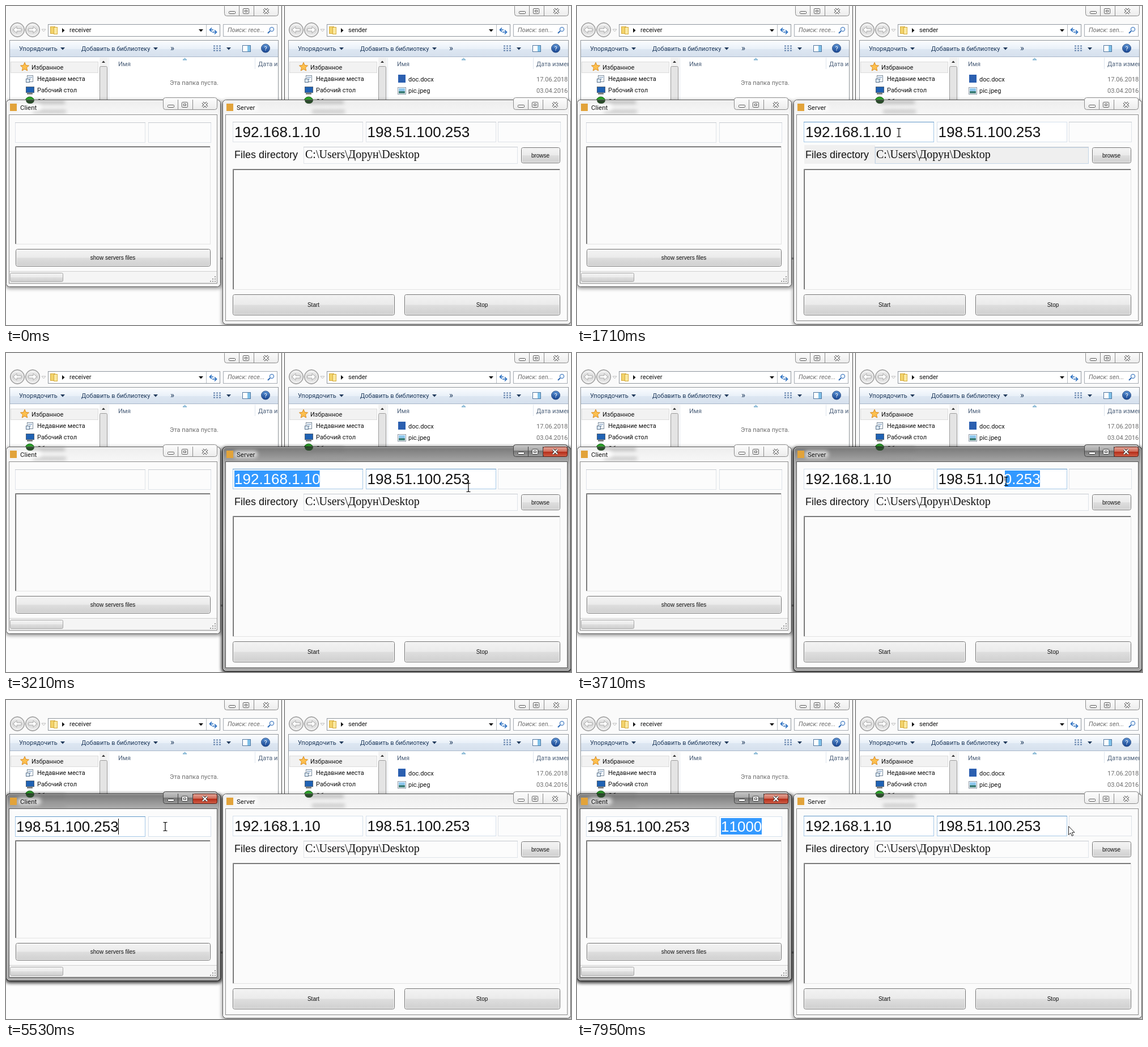
Recreate the animation shown at these times as an HTML page. Size 997x562 px, loop 8000 ms.

```html
<!DOCTYPE html>
<html lang="ru">
<head>
<meta charset="utf-8">
<style>
  html, body { margin: 0; width: 100%; height: 100%; overflow: hidden; background: #fdfdfd; }
  svg { display: block; width: 100vw; height: 100vh; }
  text { font: 11px Roboto, sans-serif; fill: #111; white-space: pre; }
  .title { font-size: 11.5px; }
  .bar { fill: #1e395b; }
  .head { fill: #4c607a; }
  .dim { fill: #6d6d6d; }
  .search { fill: #6d6d6d; font-style: italic; }
  .button { font: 10px "Liberation Sans", sans-serif; text-anchor: middle; }
  .label { font: 18px "Liberation Sans", sans-serif; }
  .path { font: 20px "Liberation Serif", serif; }
  .big { font: 26px "Liberation Sans", sans-serif; font-kerning: none; }
  .picked { fill: #fff; }
</style>
</head>
<body>
<svg id="stage" viewBox="0 0 997 562" xmlns="http://www.w3.org/2000/svg"></svg>
<script>
const LOOP = 8000;
const LOCAL = '192.168.1.10', REMOTE = '198.51.100.253', PORT = '11000';
const SERVER_ON = '1820-4930', CLIENT_ON = '4930-8000';

const box = (x0, y0, x1, y1, fill, stroke = '', r = 0, more = '') => {
  const o = stroke ? 0.5 : 0;
  return `<rect x="${x0 + o}" y="${y0 + o}" width="${x1 - x0}" height="${y1 - y0}" rx="${r}" fill="${fill}" stroke="${stroke || 'none'}" ${more}/>`;
};
const text = (x, y, str, cls = '', more = '') => `<text x="${x}" y="${y}" class="${cls}" ${more}>${str}</text>`;
const path = (d, stroke, fill = 'none', width = 1) =>
  `<path d="${d}" stroke="${stroke}" fill="${fill}" stroke-width="${width}"/>`;
const disc = (x, y, r, fill, stroke = 'none') =>
  `<circle cx="${x}" cy="${y}" r="${r}" fill="${fill}" stroke="${stroke}"/>`;
const on = (times, inner) => `<g data-on="${times}">${inner}</g>`;
const down = (x, y, color = '#1e395b') => path(`M${x - 4} ${y - 2}h8l-4 4.5z`, 'none', color);
const gradient = (id, ...stops) =>
  `<linearGradient id="${id}" x2="0" y2="1">${stops.map(([at, c]) =>
    `<stop offset="${at}" stop-color="${c}"/>`).join('')}</linearGradient>`;

const defs = `<defs>
  ${gradient('face', [0, '#f3f3f3'], [.48, '#ebebeb'], [.52, '#dedede'], [1, '#cfcfcf'])}
  ${gradient('hot', [0, '#eaf6fd'], [.48, '#d9f0fc'], [.52, '#bee6fd'], [1, '#a7d9f5'])}
  ${gradient('tools', [0, '#fbfdff'], [.5, '#e9f0f8'], [.52, '#dde7f2'], [1, '#d5e0ed'])}
  ${gradient('glass', [0, '#ededed'], [.08, '#f8f8f8'], [1, '#f3f3f3'])}
  ${gradient('glassOn', [0, '#777'], [.08, '#b0b0b0'], [.4, '#c9c9c9'], [1, '#a5a5a5'])}
  ${gradient('cap', [0, '#fdfdfd'], [1, '#ececec'])}
  ${gradient('capOn', [0, '#c8c8c8'], [.48, '#a9a9a9'], [.52, '#777'], [1, '#9a9a9a'])}
  ${gradient('red', [0, '#e3a598'], [.48, '#cf6a57'], [.52, '#b52c18'], [1, '#d0614a'])}
  ${gradient('help', [0, '#5f97d8'], [1, '#123f8c'])}
  ${gradient('orb', [0, '#f4f4f4'], [.5, '#d2d2d2'], [1, '#eee'])}
  <filter id="soft" x="-20%" y="-60%" width="140%" height="220%"><feGaussianBlur stdDeviation="3"/></filter>
  <clipPath id="stageClip"><rect width="997" height="562"/></clipPath>
</defs>`;

function caption(x, y, active) {
  const line = active ? '#444' : '#8b8b8b', ink = active ? '#3a3a3a' : '#555';
  return box(x, y - 4, x + 95, y + 17, active ? 'url(#capOn)' : 'url(#cap)', line, 4) +
    (active ? box(x + 52, y, x + 95, y + 17, 'url(#red)', '#5d1a10', 3) : '') +
    path(`M${x + 26.5} ${y}v17M${x + 52.5} ${y}v17`, line) +
    box(x + 8, y + 9, x + 19, y + 13, '#fff', ink, 1) +
    box(x + 33, y + 4, x + 43, y + 13, '#fff', ink, 1) + box(x + 36, y + 7, x + 40, y + 10, '#fff', ink) +
    path(`M${x + 70} ${y + 5}l8 8m0-8l-8 8`, ink, 'none', 4) +
    path(`M${x + 70} ${y + 5}l8 8m0-8l-8 8`, '#fff', 'none', 2);
}

function explorer(x, right, name, query, rows) {
  const r = right - 487;
  return box(x - 1, -20, right - 1, 445, '#fafafa', '#4a4a4a', 6) +
    box(x, -20, right - 2, 444, 'none', '#fff', 5) + caption(r + 385, 0) +
    [20, 47].map(c => disc(x + c, 42, 12.5, '#c9c9c9', '#8a8a8a') + disc(x + c, 42, 10.5, 'url(#orb)', '#fff')).join('') +
    path(`M${x + 13} 42l6-6v4h8v4h-8v4z`, '#aaa', '#fff') + path(`M${x + 54} 42l-6-6v4h-8v4h8v4z`, '#aaa', '#fff') +
    path(`M${x + 63} 41h7l-3.5 4z`, '#bbb', '#fff') +
    box(x + 74, 32, r + 377, 53, '#fff', '#8e959d') +
    path(`M${r + 353.5} 33v20`, '#b9bec4') +
    box(x + 78, 36, x + 86, 48, '#f3d36b', '#d5ab3c') + box(x + 84, 37, x + 90, 49, '#fbe9a1', '#d5ab3c') +
    path(`M${x + 99} 39v8l4.5-4z`, 'none', '#111') + text(x + 112, 46, name) + down(r + 344, 43, '#111') +
    path(`M${r + 359} 42h7m-3-3.5l-3.5 3.5 3.5 3.5M${r + 364} 46h7m-3-3.5l3.5 3.5-3.5 3.5`, '#2a6fc0', 'none', 1.7) +
    box(r + 383, 32, r + 478, 53, '#fff', '#a5abb2') + text(r + 391, 46, 'Поиск: ' + query, 'search') +
    disc(r + 469, 41, 3.7, '#e8f3ff', '#2d69b5') + path(`M${r + 466} 44l-4 4`, '#2d69b5', 'none', 2) +
    box(x + 6, 60, r + 480, 443, '#fff', '#8f9499') + box(x + 7, 61, r + 480, 90, 'url(#tools)') +
    path(`M${x + 7} 89.5H${r + 480}`, '#a9b7c9') +
    text(x + 23, 79, 'Упорядочить', 'bar') + down(x + 100, 75) +
    text(x + 133, 79, 'Добавить в библиотеку', 'bar') + down(x + 264, 75) + text(x + 290, 79, '»', 'bar', 'style="font-size:15px"') +
    [70, 74, 78].map(y => path(`M${r + 366} ${y + .5}h3m2 0h3m2 0h3`, '#6483ad', 'none', 2)).join('') +
    down(r + 393, 75) + box(r + 417, 69, r + 431, 80, '#fff', '#51779f') + box(r + 426, 70, r + 431, 80, '#7fc0e8') +
    disc(r + 458, 74.5, 7.5, 'url(#help)', '#33558a') +
    text(r + 458, 79, '?', 'picked', 'text-anchor="middle" font-weight="bold"') +
    // navigation pane
    box(x + 8, 98, x + 162, 117, '#f2f2f2', '#dcdcdc') +
    path(`M${x + 33} 99.5l2.2 5 5.3.5-4 3.6 1.2 5.4-4.7-2.8-4.7 2.8 1.2-5.4-4-3.6 5.3-.5z`, '#d98a1e', '#fdc04e') +
    text(x + 45, 112, 'Избранное') +
    box(x + 37, 122, x + 47, 133, '#fff', '#778899') + path(`M${x + 39} 125.5h7m-7 3h5`, '#5c87b5') +
    box(x + 35, 128, x + 41, 134, '#dce9f5', '#60758c') + text(x + 55, 132, 'Недавние места') +
    box(x + 35, 142, x + 49, 152, '#1f62b4', '#4c5f75') + path(`M${x + 37} 154.5h10`, '#555', 'none', 2) +
    text(x + 55, 152, 'Рабочий стол') +
    disc(x + 42, 168, 8, '#2fae2c', '#176516') + text(x + 55, 172, 'Облако') +
    box(x + 165, 91, x + 180, 443, '#f2f2f2') + path(`M${x + 169} 100h6l-3-3.5z`, 'none', '#333') +
    box(x + 165, 106, x + 178, 300, '#e4e4e4', '#9b9b9b', 2) + path(`M${x + 181.5} 91v350`, '#e3e8ee') +
    // file list
    text(x + 198, 106, 'Имя', 'head') + path(`M${x + 312} 95l3.5-3 3.5 3z`, '#6fa5c7', '#a9d3ea') +
    path(`M${r + (x ? 418 : 439)}.5 91v20`, '#dde5ee') +
    `<svg width="${r + 480}" height="165">${text(x + 445 - (x ? 1 : 0), 106, 'Дата изменения', 'head')}${rows}</svg>`;
}

const emptyFolder = text(289, 139, 'Эта папка пуста.', 'dim');
const files =
  box(692, 121, 705, 135, '#2b5fb0') + text(710, 133, 'doc.docx') + text(936, 133, '17.06.2018 12:40', 'dim') +
  box(691, 143, 705, 155, '#fff', '#8a97a5') + box(693, 145, 704, 150, '#8ec7ee') + box(693, 150, 704, 154, '#3f7f78') +
  text(710, 153, 'pic.jpeg') + text(936, 153, '03.04.2016 21:15', 'dim');

function frame(x0, y1, x1, name, ghost, active) {
  const edge = active ? '#222' : '#555';
  return box(x0 - 1, 166, x1 + 2, y1 + 3, '#000', '', 7, `filter="url(#soft)" opacity="${active ? .7 : .4}"`) +
    box(x0, 165, x1 - 1, y1 - 1, active ? 'url(#glassOn)' : 'url(#glass)', edge, 6) +
    box(x0 + 1, 166, x1 - 2, y1 - 2, 'none', active ? '#d5d5d5' : '#fff', 5) +
    `<g filter="url(#soft)" opacity="${active ? .6 : .5}">${box(ghost, 167, ghost + 62, 172, '#777')}${
      box(ghost + 6, 183, ghost + 64, 189, '#999')}</g>` +
    `<g filter="url(#soft)">${box(x0 + 20, 172, x0 + 62, 185, '#fff', '', 6, `opacity="${active ? .65 : .9}"`)}</g>` +
    path(`M${ghost - 7} 166h15q-1 6-7.5 6t-7.5-6z`, 'none', '#2b4b2b') +
    box(x0 + 7, 172, x0 + 19, 185, '#e2a33a') +
    text(x0 + 25, 182.5, name, 'title') + caption(x1 - 102, 165, active) +
    box(x0 + 5, 191, x1 - 7, y1 - 7, '#fbfbfb', active ? '#555' : '#8c8c8c');
}

const win = (x0, y1, x1, name, ghost, times) =>
  frame(x0, y1, x1, name, ghost) + on(times, frame(x0, y1, x1, name, ghost, true));

const field = (x0, y0, x1, y1, lit, blue) =>
  box(x0, y0, x1, y1, '#fcfcfc', '#dfe3e9') + path(`M${x0} ${y0 + .5}H${x1 + 1}`, '#c5c9cf') +
  on(lit, box(x0, y0, x1, y1, '#fff', '#d5e0ec')) +
  on(blue, box(x0, y0, x1, y1, '#fff', '#a6c9e8') + path(`M${x0} ${y0 + .5}H${x1 + 1}`, '#5f97c9'));

const list = (x0, y0, x1, y1) => box(x0, y0, x1, y1, '#fbfbfb', '#e3e3e3') +
  path(`M${x0 + .5} ${y1}V${y0 + .5}H${x1}`, '#8a8a8a') + path(`M${x0 + 1.5} ${y1}V${y0 + 1.5}H${x1}`, '#6b6b6b');

const button = (x0, y0, x1, y1, name, hover = '') => {
  const body = (fill, edge) => box(x0, y0, x1, y1, fill, edge, 3) + box(x0 + 1, y0 + 1, x1 - 1, y1 - 1, 'none', '#f8f8f8', 2);
  return body('url(#face)', '#707070') + on(hover, body('url(#hot)', '#3c7fb1')) +
    text((x0 + x1) / 2, (y0 + y1) / 2 + 4, name, 'button');
};

const caret = (x, y, times) => on(times, box(x, y, x + 1, y + 28, '#000'));
const selection = (id, x, y, width, str, times) =>
  on(times, `<g id="${id}">${box(x, y, x + width, y + 29, '#3399ff')}${text(x, y + 24, str, 'big picked')}</g>`);

const client = win(0, 495, 379, 'Client', 42, CLIENT_ON) +
  field(16, 205, 245, 240, '4640-8000', '4700-5830 7330-7460') +
  field(251, 205, 361, 240, '4540-8000', '4580-4700 5470-5530 5590-7950') +
  list(16, 247, 360, 419) + button(17, 428, 360, 458, 'show servers files') +
  box(6, 468, 372, 488, '#f5f5f5') + path('M6 467.5H372', '#cfcfcf') +
  box(7, 470, 100, 485, 'url(#face)', '#a5a5a5', 2) +
  [[368, 476], [364, 480], [368, 480], [360, 484], [364, 484], [368, 484]]
    .map(([x, y]) => box(x, y, x + 2, y + 2, '#9a9a9a')).join('') +
  on('5110-8000', text(18, 232, REMOTE, 'big')) +
  [6130, 6220, 6530, 6590, 6650].map((start, i, all) =>
    on(`${start}-${all[i + 1] || LOOP}`, text(253.5, 232, PORT.slice(0, i + 1), 'big')) +
    caret(Math.round(254 + 14.4 * (i + 1)), 209, `${start}-${all[i + 1] || 7100}`)).join('') +
  caret(19, 209, '4930-5110') + caret(198, 209, '5110-5770') + caret(254, 209, '5770-6130') +
  selection('pickPort', 254, 208, 72, PORT, '7100-8000');

const server = win(382, 561, 997, 'Server', 534, SERVER_ON) +
  on('1400-2300', box(401, 245, 526, 278, '#f0f0f0')) +
  field(400, 204, 629, 239, '1460-8000', '1520-3390 7540-8000') +
  field(635, 204, 864, 239, '1460-8000', '3030-4930 7750-8000') +
  field(868, 204, 978, 239, '', '') +
  text(403, 231, LOCAL, 'big') + text(637.5, 231, REMOTE, 'big') +
  text(403, 268, 'Files directory', 'label') +
  field(525, 248, 902, 277, '', '') + on('1400-2300', box(526, 249, 902, 277, '#efefef', '#c5d6e6')) +
  text(528, 268, 'C:\\Users\\Дорун\\Desktop', 'path') + button(909, 249, 977, 276, 'browse') +
  list(400, 287, 977, 499) +
  button(400, 508, 685, 544, 'Start', '810-1010') + button(703, 508, 977, 544, 'Stop') +
  caret(553, 208, '1820-1930') +
  selection('pickLocal', 403, 207, 150.5, LOCAL, '1930-3390') +
  selection('pickRemote', 637, 207, 180, REMOTE, '3480-4930') +
  on('4160-4930', box(637, 208, 638, 236, '#cc6600'));

const pointer = `<g id="pointer">
  ${on('1380-6040 6700-7500 7540-7930', path('M-3.5-7.5h2.5l1 1 1-1h2.5M0-6.5v13M-3.5 7.5h2.5l1-1 1 1h2.5', '#000', 'none', 1.2))}
  ${on('810-1380 7500-7540 7930-8000', path('M.5.5v15l3.5-3.3 2.3 5.3 2.4-1-2.3-5.2h4.6z', '#222', '#fff'))}
</g>`;

document.getElementById('stage').innerHTML = defs + '<g clip-path="url(#stageClip)">' +
  box(379, 165, 382, 445, '#ccc') + explorer(0, 487, 'receiver', 'rece...', emptyFolder) +
  explorer(492, 999, 'sender', 'sen...', files) + client + server + pointer + '</g>';

const run = (el, frames) => el.animate(frames, { duration: LOOP, iterations: Infinity });

for (const el of document.querySelectorAll('[data-on]')) {
  const spans = el.dataset.on.split(' ').filter(Boolean).map(s => s.split('-').map(Number));
  const frames = [{ offset: 0, opacity: 0 }];
  for (const [start, end] of spans)
    frames.push({ offset: start / LOOP, opacity: 1 }, { offset: end / LOOP, opacity: 0 });
  frames.push({ offset: 1, opacity: 0 });
  run(el, frames.map(f => ({ ...f, easing: 'step-end' })));
}

const route = [
  [0, 484, 520], [810, 484, 520], [1050, 489, 425], [1200, 497, 345], [1350, 515, 285], [1460, 545, 252],
  [1580, 568, 223], [1760, 568, 223], [1880, 556, 223], [2410, 374, 229], [2530, 374, 229], [2800, 550, 244],
  [3000, 700, 249], [3210, 816, 237], [3270, 816, 237], [3330, 820, 226], [3480, 820, 226], [4160, 635, 226],
  [4220, 635, 226], [4520, 390, 232], [4820, 176, 237], [4880, 176, 237], [4940, 165, 230], [5200, 165, 230],
  [5530, 281, 223], [6700, 281, 223], [6950, 346, 227], [7070, 346, 227], [7310, 246, 225], [7400, 246, 225],
  [7950, 867, 222], [8000, 867, 222]
];
run(document.getElementById('pointer'), route.map(([t, x, y]) =>
  ({ offset: t / LOOP, transform: `translate(${x}px, ${y}px)` })));

const drag = (id, start, end) => run(document.getElementById(id),
  [[0, 100], [start, 100], [end, 0], [LOOP, 0]].map(([t, hidden]) =>
    ({ offset: t / LOOP, clipPath: `inset(0% 0% 0% ${hidden}%)` })));
drag('pickLocal', 1930, 2330);
drag('pickRemote', 3480, 4150);
drag('pickPort', 7100, 7300);
</script>
</body>
</html>
```
